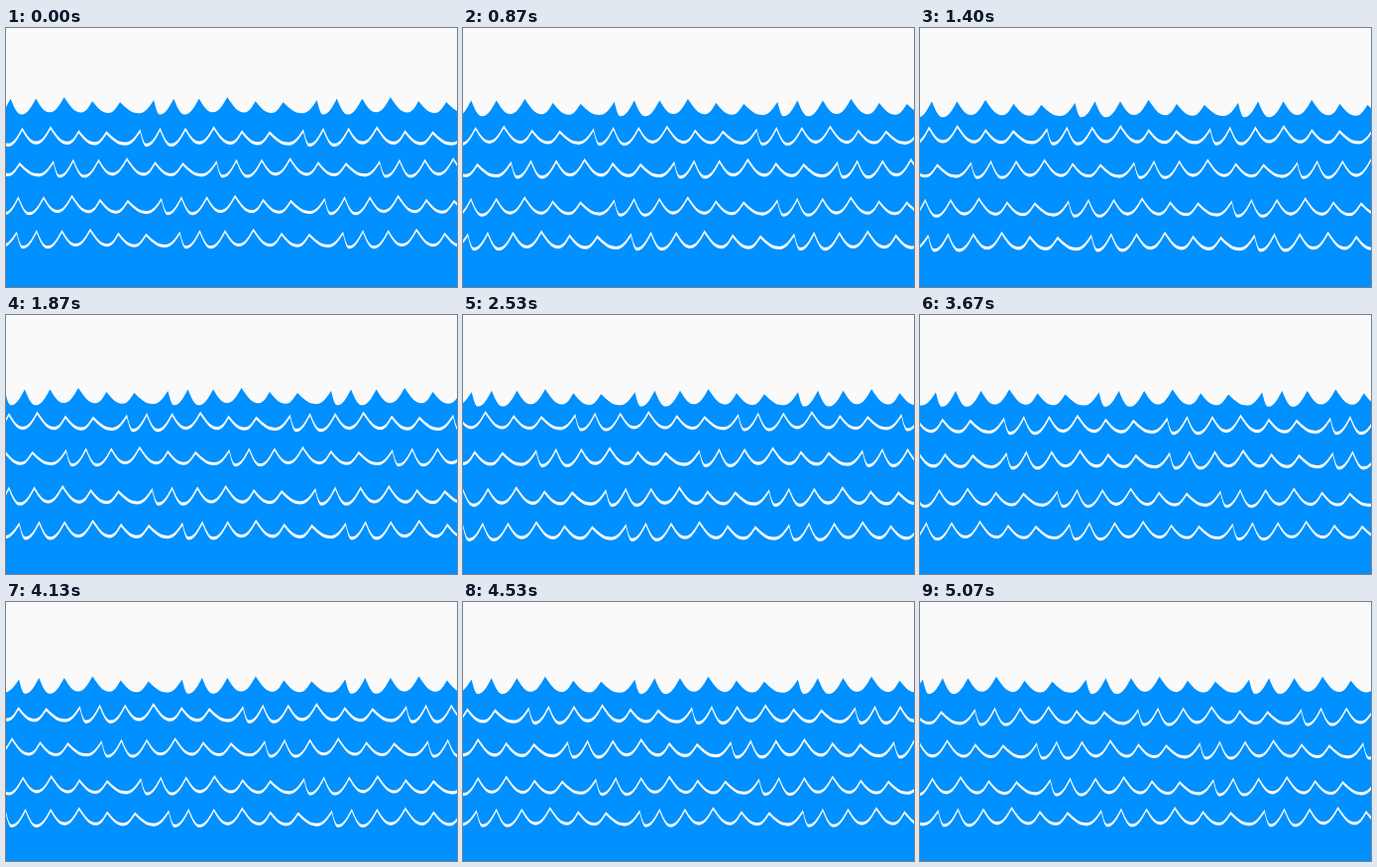
Animation, 455 px wide and 262 px high, one loop 5140 ms. Source, as an HTML page:

```html
<!DOCTYPE html>
<html>
<head>
<meta charset="utf-8">
<title>Waves</title>
<style>
  html, body { margin: 0; width: 100%; height: 100%; overflow: hidden; background: #fafafa; }
  svg { display: block; width: 100%; height: 100%; }
</style>
</head>
<body>
<svg id="sea" viewBox="0 0 455 262"></svg>
<script>
const PERIOD = 164.6, LOOP = 5140, LAST = 76, LINE = 3.1;
const WATER = '#0090ff', FOAM = '#fff';

// One period of the crest: alternating peaks and troughs
const CREST = [
  [0, 0], [17.2, 15.5], [28.4, 4], [44.5, 16], [56.3, 5], [75.5, 16.3], [90.4, 3],
  [96.5, 17.5], [110.5, 1.5], [121.5, 17.5], [136, 1.5], [150, 15.3], [PERIOD, 0]
];

// Evenly spaced stations of each row's drift over the loop
const ROWS = [
  { x: [58.7, 64, 83, 91, 77], y: [70, 75, 75.5] },
  { x: [45, 39.5, 22.7, -9, -35], y: [99.3, 97, 105] },
  { x: [122, 123, 148, 163, 192], y: [131, 133.3, 139] },
  { x: [66.5, 41], y: [168.7, 173.3, 176] },
  { x: [85, 78, 81, 88, 74, 66, 59, 87, 92.5], y: [202.7, 208.3, 207] }
];

// Fairly straight off the peaks, level at the troughs
function curve([ax, ay], [bx, by], falling) {
  const [p, t] = falling ? [[ax, ay], [bx, by]] : [[bx, by], [ax, ay]];
  const dx = t[0] - p[0], dy = t[1] - p[1];
  const nearPeak = [p[0] + dx * 0.34, p[1] + dy * 0.56];
  const nearTrough = [t[0] - dx * 0.42, t[1]];
  const controls = falling ? [nearPeak, nearTrough] : [nearTrough, nearPeak];
  return 'C' + [...controls, [bx, by]].join(' ');
}

function wavePath() {
  let d = 'M0 0';
  for (let n = 0; n < 4; n++) {
    const pts = CREST.map(([x, y]) => [x + n * PERIOD, y]);
    for (let i = 1; i < pts.length; i++) d += curve(pts[i - 1], pts[i], i % 2);
  }
  return d + 'V300H0Z';
}

// Value at u (0 to 1) along evenly spaced keys
function along(keys, u) {
  const pos = u * (keys.length - 1);
  const i = Math.min(Math.floor(pos), keys.length - 2);
  return keys[i] + (keys[i + 1] - keys[i]) * (pos - i);
}

const sea = document.getElementById('sea');
const shape = wavePath();
sea.innerHTML = ROWS.map((_, i) => '<g>' +
  (i ? `<path d="${shape}" fill="${FOAM}"/>` : '') +
  `<path d="${shape}" fill="${WATER}" transform="translate(0 ${i ? LINE : 0})"/></g>`
).join('');

function draw() {
  const t = performance.now() % LOOP;
  const u = Math.min(LAST, Math.floor((t + 4) * 0.015)) / LAST; // 15 steps per second
  ROWS.forEach((row, i) => {
    const left = (along(row.x, u) + PERIOD) % PERIOD - PERIOD;
    sea.children[i].setAttribute('transform', `translate(${left} ${along(row.y, u)})`);
  });
  requestAnimationFrame(draw);
}
draw();
</script>
</body>
</html>
```
